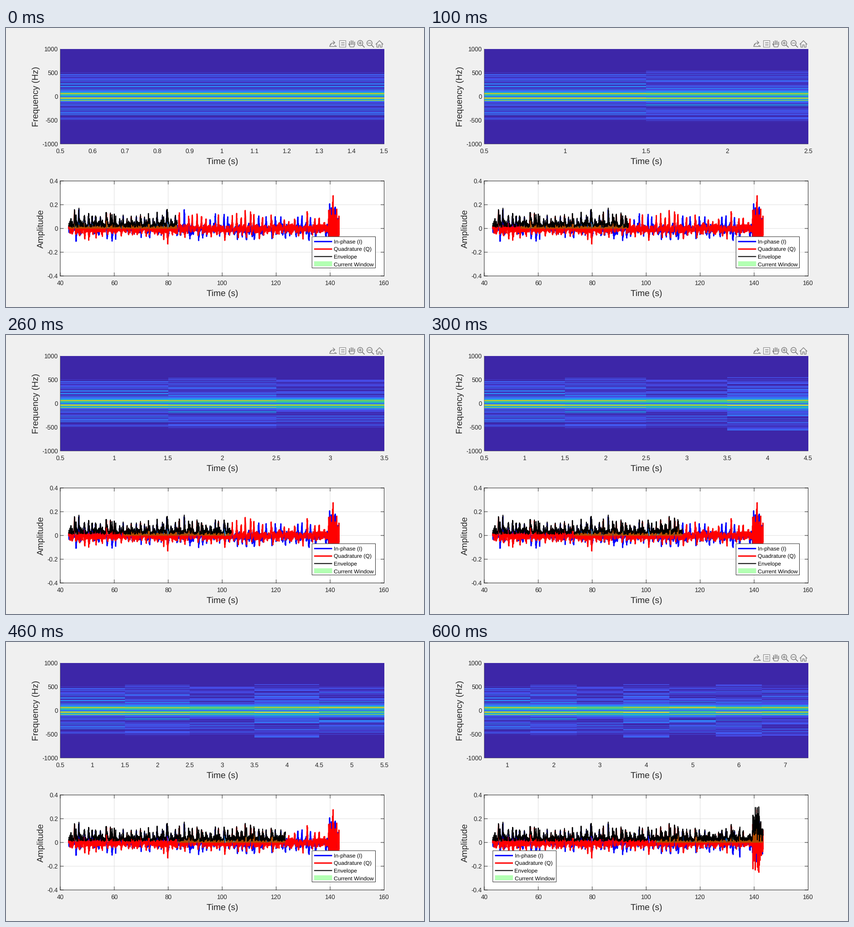
Animation, 917 px wide and 611 px high, one loop 0.7 s. Source, as a matplotlib script:

```python
import numpy as np
import matplotlib.pyplot as plt
from matplotlib.animation import FuncAnimation
from matplotlib.colors import LinearSegmentedColormap
from matplotlib.patches import Circle, Polygon, Rectangle

W, H, DPI = 917, 611, 100
PX = 72 / DPI                       # points per pixel
INK, ICON = "#262626", "#808080"
L, R = 119, 829.5                   # shared horizontal span of both plots
TOP1, BOT1 = 46, 254
TOP2, BOT2 = 335, 543
ZERO = 439.5
SEC = (R - L) / 120                 # pixels per second, lower plot

plt.rcParams["font.family"] = "Liberation Sans"
plt.rcParams["toolbar"] = "None"
plt.rcParams["text.hinting"] = "none"
fig = plt.figure(figsize=(W / DPI, H / DPI), dpi=DPI, facecolor="#f0f0f0")
ax = fig.add_axes([0, 0, 1, 1])
ax.axis("off")


def label(x, y, s, size=13.6, ha="center", color=INK, **kw):
    return ax.text(x, y, s, fontsize=size * PX, color=color, ha=ha,
                   va="baseline", rotation_mode="anchor", **kw)


def stroke(xs, ys, color=INK, width=1.0, z=3, **kw):
    return ax.plot(xs, ys, color=color, lw=width * PX, zorder=z,
                   snap=False, **kw)[0]


def box(x0, y0, x1, y1, z, fc="white", ec="none"):
    return ax.add_patch(Rectangle((x0, y0), x1 - x0, y1 - y0, fc=fc, ec=ec,
                                  lw=PX, zorder=z, snap=False))


# ---------- spectrogram ----------
parula = LinearSegmentedColormap.from_list("par", [
    (.2422, .1504, .6603), (.281, .323, .958), (.179, .529, .968),
    (.069, .695, .839), (.216, .784, .592), (.672, .779, .223),
    (.997, .766, .220), (.977, .984, .080)])


def spectrum(k):
    """One second: thin random lines, a cyan halo, bright bands near zero."""
    rng = np.random.default_rng(40 + k)
    f = 1000 - (np.arange(208) + .5) * 2000 / 208
    u = rng.random(f.size)
    reach = rng.uniform(500, 610)
    v = u ** 2.2 * (.4 * np.exp(-abs(f) / 180) + .22) * (abs(f) < reach)
    halo = (.3 + .3 * u) * np.exp(-((f - 5) / 125) ** 4)
    v = np.maximum(v, halo)
    for c, level, w in ((62, .9, 24), (-36, 1, 18), (-82, .85, 12)):
        band = level * rng.uniform(.85, 1) * np.exp(-((f - c) / w) ** 4)
        v = np.maximum(v, band * (.72 + .28 * u))
    v[abs(f) < 10] = .2
    return v


spec = np.column_stack([spectrum(k) for k in range(7)])
image = ax.imshow(spec[:, :1], cmap=parula, vmin=0, vmax=1, aspect="auto",
                  interpolation="nearest", extent=(L, R, BOT1, TOP1), zorder=1)
ax.set(xlim=(0, W), ylim=(H, 0), autoscale_on=False)

stroke([L, L, R], [TOP1, BOT1, BOT1], width=.6)
for v in range(-1000, 1001, 500):
    label(114, 155 - v * .104, str(v), ha="right")
label(474.5, 298, "Time (s)", 19.2)
label(71, 150, "Frequency (Hz)", 19.2, rotation=90)
ticks = [label(0, 273.5, "") for _ in range(11)]

# ---------- signal plot ----------
box(L, TOP2, R, BOT2, 1)
for i in range(7):
    x = L + i * 20 * SEC
    label(x, 563, str(40 + 20 * i))
    stroke([x, x], [TOP2, BOT2], "#dedede", z=2)
    for y, d in ((TOP2, 7), (BOT2, -7)):
        stroke([x, x], [y, y + d], z=7)
for i in range(5):
    y = TOP2 + 52 * i
    label(114, y + 5, f"{(2 - i) / 5:g}", ha="right")
    stroke([L, R], [y, y], "#dedede", z=2)
    for x, d in ((L, 7), (R, -7)):
        stroke([x, x + d], [y, y], z=7)
box(L, TOP2, R, BOT2, 7, fc="none", ec=INK)
label(474.5, 587, "Time (s)", 19.2)
label(82, ZERO, "Amplitude", 19.2, rotation=90)

rng = np.random.default_rng(7)
X0, X1 = 137.5, 731
x = np.arange(X0, X1, .25)


def hum(low, extra):
    """Noise whose strength swells and fades every few pixels."""
    knots = np.arange(X0, X1 + 4, 3.5)
    swell = np.interp(x, knots, rng.random(knots.size) ** 2.5)
    return (low + extra * swell) * rng.uniform(-1, 1, x.size)


sig_i, sig_q = hum(4, 13), hum(6.5, 8)

# heartbeats: a sharp pulse in one channel, an opposite dip just after
for beat in np.arange(141, 705, 9.6):
    c = beat + rng.normal(0, 1.2)
    h = (18 + 22 * rng.random() ** 1.6) * (1.05 - .25 * (c - X0) / (X1 - X0))
    up, down = (sig_i, sig_q) if rng.random() < .45 else (sig_q, sig_i)
    up += h * np.exp(-((x - c) / 1.1) ** 2)
    dip = h * rng.uniform(.2, .85)
    for sig, part in ((up, .5), (down, 1)):
        sig -= part * dip * np.exp(-((x - c - rng.uniform(1, 4)) / 1.1) ** 2)

# closing burst
burst = x > 707
bx = x[burst]
amp = np.interp(bx, [707, 722, 724, 731], [80, 88, 54, 30])
amp *= .84 + .16 * np.cos(2 * np.pi * (bx - 709.5) / 4)
turn = rng.uniform(0, 2 * np.pi, bx.size)
size = amp * rng.random(bx.size) ** .6
sig_i[burst] = .85 * size * np.cos(turn)
sig_q[burst] = size * np.sin(turn)
env = 2 + np.hypot(sig_i, sig_q)

stroke(x, ZERO - sig_i, "blue", 2.6, z=3)
stroke(x, ZERO - sig_q, "red", 2.6, z=4)
window = ax.add_patch(Polygon([(0, 0), (1, 0), (1, 1)], fc="lime", alpha=.3,
                              ec="none", zorder=5))
envelope = stroke([], [], "black", 2, z=6)


def legend(dx):
    x0, x1 = 676 + dx, 715.5 + dx
    parts = [box(671.3 + dx, 457, 810.5 + dx, 525.5, 8, ec=INK)]
    rows = [("In-phase (I)", "blue", 3), ("Quadrature (Q)", "red", 3),
            ("Envelope", "black", 2), ("Current Window", None, 0)]
    for i, (name, color, width) in enumerate(rows):
        y = 467.7 + 16.4 * i
        if color:
            parts.append(stroke([x0, x1], [y, y], color, width, z=9,
                                solid_capstyle="butt"))
        else:
            parts.append(box(x0, y - 6, x1, y + 5, 9, fc="#b3ffb3"))
        parts.append(label(719 + dx, y + 4.6, name, 12.2, "left",
                           "black", zorder=9))
    return parts


legend_right, legend_left = legend(0), legend(-533.5)


# ---------- toolbar ----------
def icon(*pts, width=1.4):
    return stroke(*zip(*pts), ICON, width)


def ring(cx, cy, r):
    return ax.add_patch(Circle((cx, cy), r, fc="none", ec=ICON, lw=1.5 * PX, zorder=3))


tools = [
    # export
    icon((712, 35), (710, 40.5), (721, 40.5), (722, 38)),
    icon((712.5, 37), (714, 33.5), (720, 32)),
    icon((717.5, 28.5), (721.5, 32), (718, 35.5)),
    ax.add_patch(Polygon([(721.5, 39), (726, 39), (723.8, 42)], fc=ICON, zorder=3)),
    # data tip
    box(731.5, 27.5, 745.5, 42, 3, fc="none", ec=ICON),
    icon((736, 32.5), (742, 32.5)),
    icon((736, 37), (742, 37)),
    # hand
    icon((754.5, 37), (751.5, 34.5), (755, 41.5), (763, 41.5), (765, 36)),
]
tools += [icon((753.8 + 3.6 * i, top), (754.6 + 3.4 * i, 36), width=1.8)
          for i, top in enumerate((30, 28, 28.5, 31))]
for cx in (777, 797.5):
    tools += [ring(cx, 33, 5.7), icon((cx + 4.2, 37.2), (cx + 9, 42), width=1.8),
              icon((cx - 3, 33), (cx + 3, 33))]
tools += [
    icon((777, 30), (777, 36)),
    # home
    icon((811.5, 35.5), (819.3, 27.7), (827, 35.5)),
    icon((813.5, 34.5), (813.5, 42), (817.5, 42), (817.5, 37), (821, 37),
         (821, 42), (825, 42), (825, 34.5)),
]


def show(parts, on):
    for p in parts:
        p.set_visible(on)


def update(k):
    n = k + 1
    image.set_data(spec[:, :n])

    step = .1 if k == 0 else .5 if k < 5 else 1
    first = 1 if k > 4 else .5
    values = np.arange(first, n + .5 + 1e-6, step)
    show(ticks, False)
    for t, v in zip(ticks, values):
        t.set_visible(True)
        t.set_x(L + (v - .5) / n * (R - L))
        t.set_text(f"{v:g}")

    # envelope grows 10 s per step, the window spans its last 40 s
    end = L + (43.4 + 10 * k) * SEC
    seen = x <= end
    envelope.set_data(x[seen], ZERO - env[seen])
    part = seen & (x >= end - 40 * SEC)
    px = x[part]
    window.set_xy(np.column_stack([
        np.r_[px[0], px, px[-1]], np.r_[ZERO, ZERO - env[part], ZERO]]))

    show(legend_right, k < 6)
    show(legend_left, k == 6)
    show(tools, k != 4)
    return []


anim = FuncAnimation(fig, update, frames=7, interval=100, repeat=True,
                     repeat_delay=0, blit=False)
plt.show()
```
